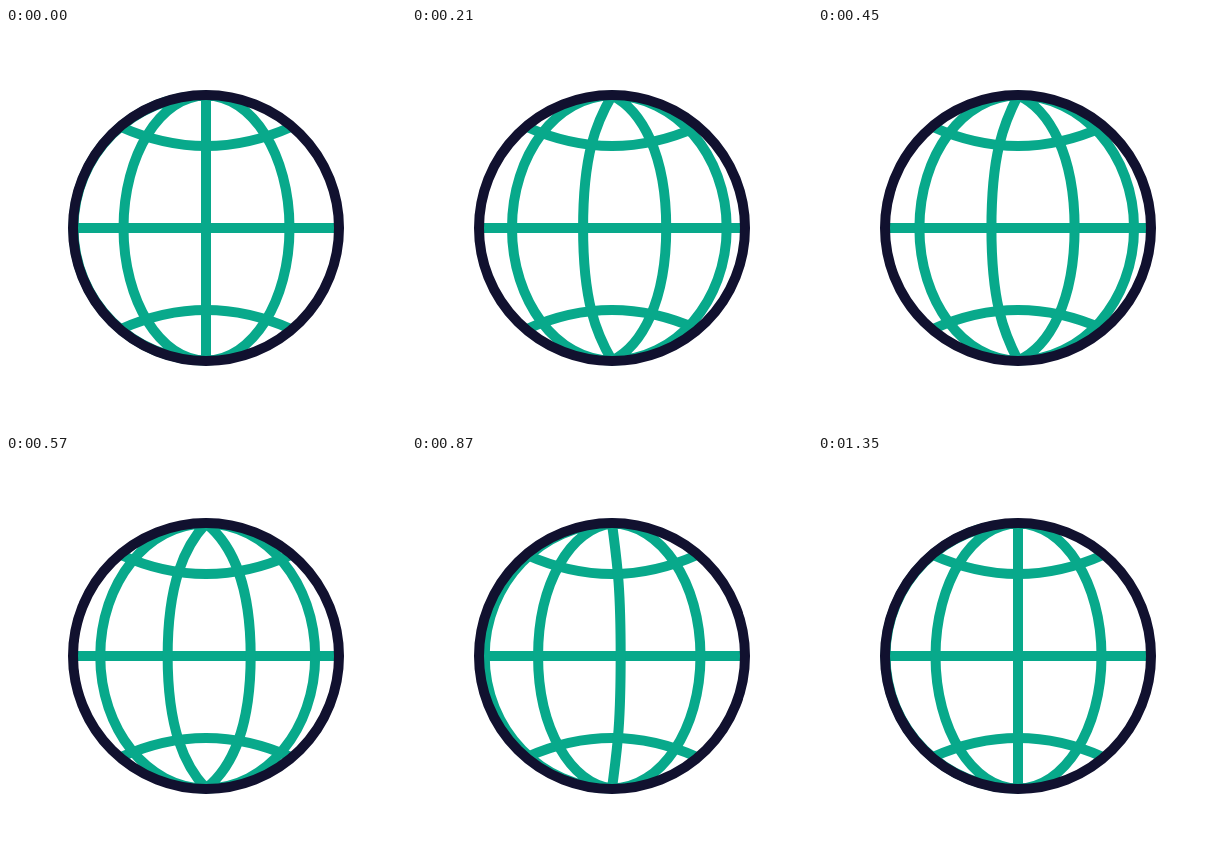
Animation of 400x400 px, one loop 2.47 s. Source, as an HTML page:

```html
<!DOCTYPE html>
<html lang="en">
<head>
<meta charset="utf-8">
<title>Spinning globe</title>
<style>
  html, body { margin: 0; width: 100%; height: 100%; overflow: hidden; background: #fff; }
  svg { display: block; width: 100vw; height: 100vh; }
</style>
</head>
<body>
<svg viewBox="0 0 400 400">
  <g fill="none" stroke="#08a98b" stroke-width="10">
    <path d="M68 200H332"/>
    <path d="M115 99Q200 137 285 99"/>
    <path d="M115 301Q200 263 285 301"/>
    <path id="meridians"/>
  </g>
  <circle cx="200" cy="200" r="133" fill="none" stroke="#11112f" stroke-width="10"/>
</svg>
<script>
  const LOOP = 2470, SPIN = 1350, STEP = 30, TURNS = 7;
  const RADIUS = 132.5, KAPPA = 0.5523;
  // Resting meridians: offset from the axis and downward handle at the pole.
  // Each one morphs into the next; only the straight one leaves the pole vertically.
  const STOPS = [
    { x: -132.5, dip: 0 },
    { x: -82.5, dip: 0 },
    { x: 0, dip: 42 },
    { x: 83.5, dip: 0 },
    { x: 131.5, dip: 0 }
  ];
  const meridians = document.getElementById("meridians");

  const lerp = (a, b, k) => a + (b - a) * k;
  const bezier = (a, b, s) => 3 * a * s * (1 - s) ** 2 + 3 * b * s * s * (1 - s) + s ** 3;

  // Abrupt start, long soft landing.
  function ease(u) {
    if (u >= 1) return 1;
    let lo = 0, hi = 1;
    for (let i = 0; i < 40; i++) {
      const mid = (lo + hi) / 2;
      if (bezier(0.167, 0.457, mid) < u) lo = mid; else hi = mid;
    }
    return bezier(0.167, 1, lo);
  }

  function meridian(x, dip) {
    const top = 200 - RADIUS, bottom = 200 + RADIUS;
    const side = 200 + x, lean = 200 + x * KAPPA, arm = RADIUS * KAPPA;
    return `M200 ${top}C${lean} ${top + dip} ${side} ${200 - arm} ${side} 200` +
      `S${lean} ${bottom - dip} 200 ${bottom}`;
  }

  function draw(time) {
    const t = Math.floor((time % LOOP) / STEP) * STEP;
    const phase = (TURNS * ease(t / SPIN)) % 1;
    meridians.setAttribute("d", STOPS.slice(0, -1).map((from, i) => {
      const to = STOPS[i + 1];
      return meridian(lerp(from.x, to.x, phase), lerp(from.dip, to.dip, phase));
    }).join(""));
  }

  const start = performance.now();
  function tick() {
    draw(performance.now() - start);
    requestAnimationFrame(tick);
  }
  tick();
</script>
</body>
</html>
```
